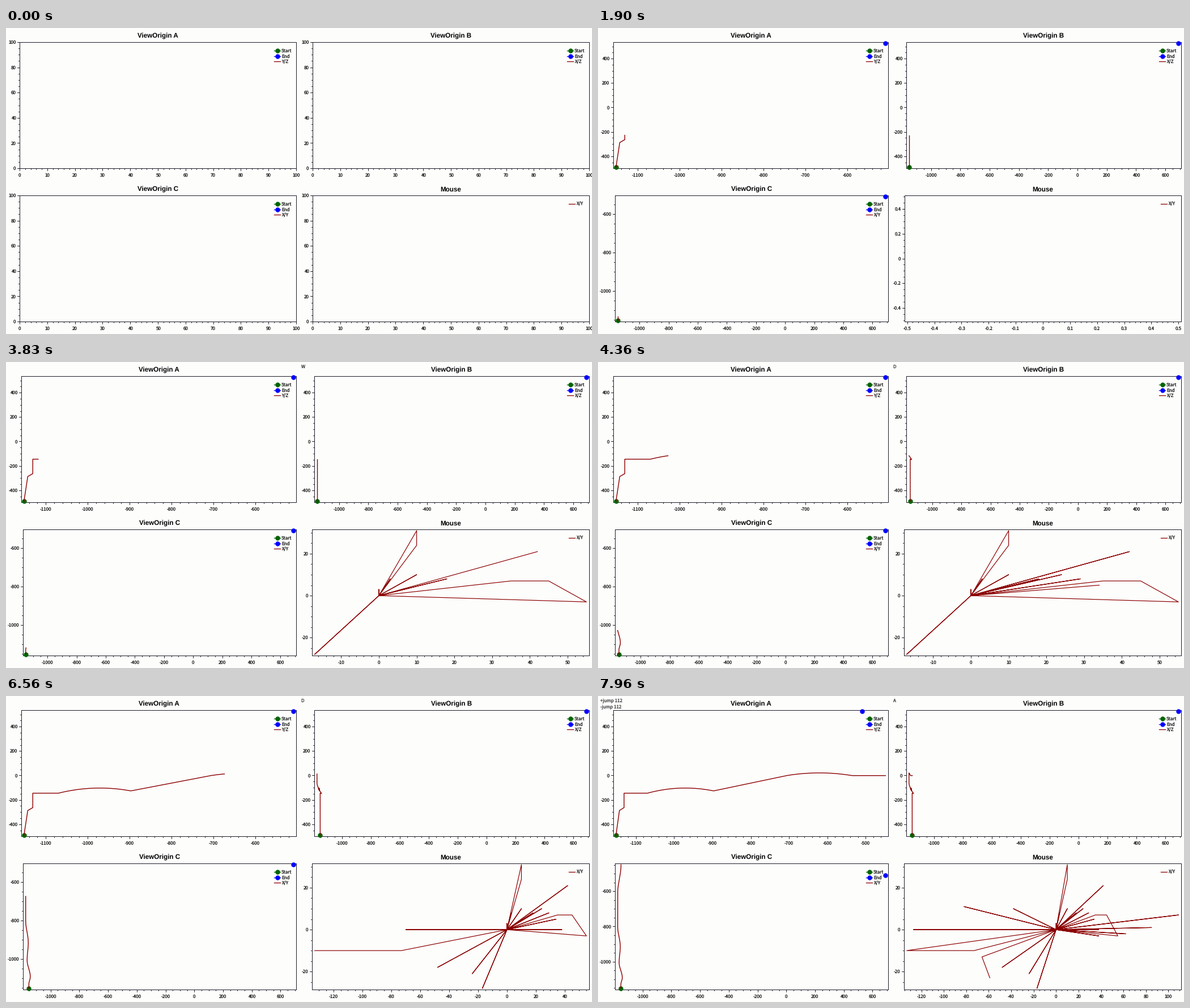
Recreate the animation shown at these times as a matplotlib script. Size 1034 by 541 pixels, loop 8 s.

```python
import math

import matplotlib.pyplot as plt
import numpy as np
from matplotlib.animation import FuncAnimation

W, H, DPI = 1034, 541, 64
LOOP, STEP = 8000, 40
BEGIN = 30
PT = 72 / DPI
INK, RED, GREEN, BLUE = "#1c1c28", "#8b0000", "#006400", "#0000ff"
FONT = ["Noto Sans CJK JP", "Liberation Sans"]

plt.rcParams["text.hinting"] = "no_hinting"
fig = plt.figure(figsize=(W / DPI, H / DPI), dpi=DPI, facecolor="#fdfdfc")
stage = fig.add_axes([0, 0, 1, 1])
stage.set(xlim=(0, W), ylim=(H, 0))
stage.axis("off")


def line(color=INK, width=1.0, xs=(), ys=(), z=2, **kw):
    return stage.plot(xs, ys, color=color, lw=width * PT, zorder=z, **kw)[0]


def label(x, y, text="", ha="left", size=8, **kw):
    kw.setdefault("family", FONT)
    kw.setdefault("color", "#111111")
    return stage.text(x, y, text, ha=ha, va="baseline", fontsize=size * PT, **kw)


def dot(color, xs=(), ys=()):
    return line(color, 1, xs, ys, z=3, marker="o", ms=8.4 * PT, mew=0)


# --- the player's route: a lift, a walk, a jump, a slope, a second jump --
END = (690, -509, 525)
WALK_START, WALK_SPEED = 3740, 0.161


def eased(v, stops, values):
    """Cosine-eased interpolation between a few stops."""
    index = np.arange(len(stops))
    at = np.interp(v, stops, index)
    whole = np.floor(at)
    return np.interp(whole + (1 - np.cos(np.pi * (at - whole))) / 2, index, values)


def arc(y, peak_y, peak_z, bend):
    return peak_z - bend * (y - peak_y) ** 2


def route(t):
    lift = np.interp(t, [BEGIN, 1190, 2880], [-488, -287, -145])
    y = np.interp(lift, [-488, -287, -264], [-1152, -1143, -1131])
    y = y + WALK_SPEED * np.maximum(t - WALK_START, 0)
    x = eased(y, [-1131, -1092, -1005, -915, -800, -612, -452],
              [-1151, -1141, -1163, -1155, -1173, -1173, -1150])
    z = np.select([y < -1070, y < -897, y < -707, y < -535],
                  [lift, arc(y, -971, -103, 0.0043), 0.658 * (y + 705),
                   arc(y, -621, 21, 0.003)], -1)
    return np.array([x, y, z])


times = np.arange(BEGIN, LOOP + STEP, 10)
ROUTE = route(times)


# --- mouse strokes: each starts and ends at rest ------------------------
def fan(count, reach, angles):
    """Single flicks whose length and direction sweep evenly."""
    radii = np.linspace(*reach, count)
    turns = np.radians(np.linspace(*angles, count))
    return [[(round(r * math.cos(a)), round(r * math.sin(a)))]
            for r, a in zip(radii, turns)]


BURSTS = [
    (2500, 2840, [[(10, 24), (10, 31)]]),
    (2930, 3790, fan(4, (20, 3), (25, 90))
     + [[(35, 7), (45, 7), (55, -3)], [(-17, -28)], [(42, 21)]]),
    (3900, 5260, fan(4, (26, 38), (23, 0)) + fan(3, (32, 70), (221, 180))
     + [[(-73, -10), (-133, -10)]]),
    (6640, 7880, fan(4, (38, 109), (-4.5, 3.7)) + fan(3, (39, 127), (165, 180))
     + [[(-66, -13), (-59, -23)]]),
]


def mouse_track():
    stamps, points = [BEGIN], [(0, 0)]
    for start, stop, strokes in BURSTS:
        burst = [p for stroke in strokes for p in [(0, 0), *stroke]]
        stamps += list(np.linspace(start, stop, len(burst)))
        points += burst
    return np.array(stamps), np.array(points, float).T


MOUSE_TIMES, MOUSE = mouse_track()


# --- plots --------------------------------------------------------------
def padded(values):
    lo, hi = min(values), max(values)
    if lo == hi:
        lo, hi = lo - 0.5, hi + 0.5
    pad = 0.01 * (hi - lo)
    return lo - pad, hi + pad


def tick_values(lo, hi, length):
    """Major values and minor values for an axis of the given pixel length."""
    least = 38 * (hi - lo) / length
    power = 10 ** math.floor(math.log10(least))
    factor = next(f for f in (1, 2, 5, 10) if f * power >= least)
    major = factor * power

    def multiples(step):
        first, last = math.ceil(lo / step - 1e-6), math.floor(hi / step + 1e-6)
        return [round(k * step, 6) + 0.0 for k in range(first, last + 1)]

    return multiples(major), multiples(major / (4 if factor == 2 else 5))


def text_width(text):
    return sum({"-": 2.84, ".": 1.6}.get(c, 3.83) for c in text)


class Panel:
    def __init__(self, title, ox, oy, series, ends=True):
        self.ox, self.right = ox, ox + 512
        self.top, self.bottom = oy + 25, oy + 248
        self.frame, self.ticks = line(), line(width=0.9)
        self.trail = line(RED, 1.4 if ends else 1.2, z=4, solid_joinstyle="round")
        self.title = label(0, oy + 17.4, title, "center", 11.6, weight="bold",
                           family="Liberation Sans", color="black")
        self.labels = [label(0, 0) for _ in range(26)]
        self.ends = [dot(GREEN), dot(BLUE)] if ends else []
        self.legend(series, ox + (478.5 if ends else 481.5), oy + 40, ends)

    def legend(self, series, x, y, ends):
        rows = [("Start", GREEN), ("End", BLUE)] if ends else []
        for i, (name, color) in enumerate(rows + [(series, RED)]):
            row = y + 9.7 * i
            line(color, 1.3, [x - 5.5, x + 5], [row, row])
            if name != series:
                dot(color, [x], [row])
            label(x + 7.5, row + 2.8, name)

    def draw(self, xr, yr, trail=((), ()), ends=()):
        ymajor, yminor = tick_values(*yr, self.bottom - self.top)
        margin = max(text_width(f"{v:g}") for v in ymajor)
        left = self.ox + int(12.8 + margin)
        right, top, bottom = self.right, self.top, self.bottom
        xmajor, xminor = tick_values(*xr, right - left)

        def px(v):
            return left + (np.asarray(v) - xr[0]) / (xr[1] - xr[0]) * (right - left)

        def py(v):
            return bottom - (np.asarray(v) - yr[0]) / (yr[1] - yr[0]) * (bottom - top)

        self.frame.set_data([left, right, right, left, left],
                            [top, top, bottom, bottom, top])
        self.title.set_x((left + right) / 2)
        self.trail.set_data(px(trail[0]), py(trail[1]))
        for marker, (x, y) in zip(self.ends, ends):
            marker.set_data([px(x)], [py(y)])

        xs, ys = [], []
        for values, size in ((xmajor, 4), (xminor, 2.3)):
            for x in px(values):
                xs += [x, x, np.nan]
                ys += [bottom, bottom + size, np.nan]
        for values, size in ((ymajor, 4), (yminor, 2.3)):
            for y in py(values):
                xs += [left - size, left, np.nan]
                ys += [y, y, np.nan]
        self.ticks.set_data(xs, ys)

        wanted = [(px(v), bottom + 15, v, "center") for v in xmajor]
        wanted += [(left - 6.5, py(v) + 3, v, "right") for v in ymajor]
        for i, text in enumerate(self.labels):
            text.set_visible(i < len(wanted))
            if i < len(wanted):
                x, y, value, ha = wanted[i]
                text.set(position=(x, y), text=f"{value:g}", ha=ha)


VIEWS = [(Panel("ViewOrigin A", 0, 0, "Y/Z"), (1, 2)),
         (Panel("ViewOrigin B", 517, 0, "X/Z"), (0, 2)),
         (Panel("ViewOrigin C", 0, 271, "X/Y"), (0, 1))]
mouse = Panel("Mouse", 517, 271, "X/Y", ends=False)
key = label(520, 11.3, color="#333333")
commands = [label(3.5, 11.3, color="#333333"), label(3.5, 21.8, color="#333333")]


def pressed_key(t):
    for since, name in ((6950, "A"), (4200, "D"), (2560, "W")):
        if t >= since:
            return name
    return ""


def update(frame):
    t = (frame + 0.5) * STEP
    key.set_text(pressed_key(t))
    for text, sign in zip(commands, "+-"):
        text.set_text(f"{sign}jump 112" if t >= 7900 else "")

    if t < BEGIN:
        for panel in [view for view, _ in VIEWS] + [mouse]:
            panel.draw((0, 100), (0, 100))
            for marker in panel.ends:
                marker.set_data([], [])
        return

    walked = ROUTE[:, times <= t]
    for panel, (a, b) in VIEWS:
        goal = END[a], END[b]
        panel.draw(padded([*walked[a], goal[0]]), padded([*walked[b], goal[1]]),
                   (walked[a], walked[b]), [(walked[a][0], walked[b][0]), goal])
    moved = MOUSE[:, MOUSE_TIMES <= t]
    mouse.draw(padded(moved[0]), padded(moved[1]), moved)


animation = FuncAnimation(fig, update, frames=LOOP // STEP, interval=STEP,
                          init_func=lambda: update(0), repeat=True, repeat_delay=0)
plt.show()
```
